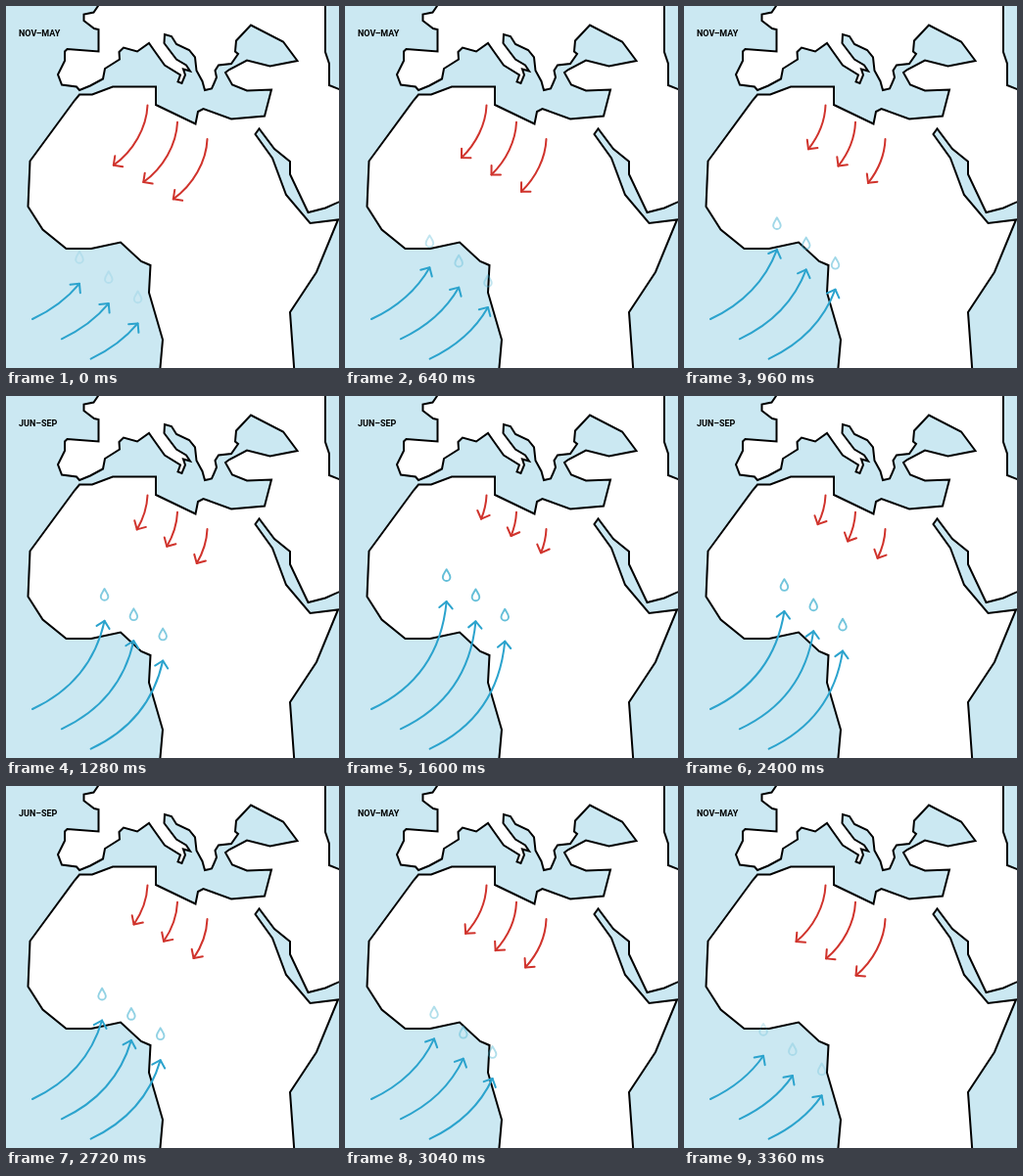
Animation of 340 by 370 pixels, one loop 3520 ms. Source, as an HTML page:

```html
<!DOCTYPE html>
<html lang="en">
<head>
<meta charset="utf-8">
<title>Seasonal winds</title>
<style>
html, body { margin: 0; width: 100%; height: 100%; overflow: hidden; background: #cbe8f2; }
svg { display: block; width: 340px; height: 370px; fill: none; stroke-width: 2; stroke-linecap: round; stroke-linejoin: round; }
text { font: bold 9px Roboto, sans-serif; fill: #000; }
</style>
</head>
<body>
<svg viewBox="0 0 340 370">
  <defs>
    <path id="head" d="M-6.7-6.7L0 0L-6.7 6.7"/>
    <g id="wet" stroke="#2ba3cd">
      <path id="wetLine" d="M27 320C65.500 302 105 266 104.500 190"/>
      <use id="wetHead" href="#head"/>
      <path id="drop" stroke="#43b1d0" stroke-width="1.9" d="M0-5.9C1.300-3.200 3.800-.5 3.800 2.100A3.800 3.800 0 0 1-3.800 2.100C-3.800-.5-1.300-3.200 0-5.900Z"/>
    </g>
    <g id="dry" stroke="#d0332c">
      <path id="dryLine" d="M144.500 101.500C143.500 126 128 152 104.800 166"/>
      <use id="dryHead" href="#head"/>
    </g>
  </defs>

  <path fill="#fff" stroke="#000" stroke-linejoin="miter" d="M157 375L160 341 146 293 147.500 265 138 261 117 241.500 87 248H61.500L37.500 228.500 22.500 205 24.500 158.500 70 96.500 75 90.500H88L109 82.500H153V101L193.500 120.500 196 108 201.500 105 230 115.500 264 112.500 271 85.500 246 86.500 231 80.500 224 68 228 65 246 55.500 269.500 61.500 297.500 56 283 36.500 250 19.500 235 35.500 234 46.500 237 49 230 59 217 60.500 213.500 66 215 73 212 80 210 84.500 203 86 200.500 77 194.500 66 193 52.500 187 45 174 39 169 31 162 29 161.500 38 174 54.500 184 60.500 188 66.500 181 64.500 183 70.500 179.500 79 175.500 77.500 178 70.500 162 60.500 152 46.500 146 38 134 46.500 120 42.500 115.500 47 116 54.500 101 64 99 74.500 86 81.500 75 86 72 82.500 57 80.500 53 70 60 56 60 46.500 62.500 44 94.500 46.500V24L90 23 79.500 15V8.500L89.500 6.500 94 0V-5H326V47L330 59V81L345 87V198L326 206.500 308.500 211 290 172V159L274 146 258.500 125.500 254.500 131 272 155.500 286 193 310.500 222 339 218.500 317 272 290 313 294.500 375Z"/>

  <use href="#dry"/>
  <use href="#dry" x="30.5" y="17.3"/>
  <use href="#dry" x="61" y="34.6"/>
  <use href="#wet"/>
  <use href="#wet" x="29.8" y="20.3"/>
  <use href="#wet" x="59.6" y="40.6"/>
  <text id="season" x="13" y="31">NOV–MAY</text>
</svg>
<script>
const LOOP = 3520, STEP = 160, HALF = LOOP / 2;
const $ = id => document.getElementById(id);

// Shows the given share of a wind line and returns its tip.
function grow(name, share) {
  const line = $(name + 'Line');
  const length = line.getTotalLength() * share;
  const tip = line.getPointAtLength(length);
  const back = line.getPointAtLength(length - 2);
  const angle = Math.atan2(tip.y - back.y, tip.x - back.x) * 180 / Math.PI;
  line.setAttribute('stroke-dasharray', `${length} 999`);
  $(name + 'Head').setAttribute('transform', `translate(${tip.x} ${tip.y}) rotate(${angle})`);
  return tip;
}

function draw(now) {
  const time = Math.floor(now % LOOP / STEP) * STEP;
  // Summer strength: 0 at 160 ms, 1 half a loop later.
  const summer = 1 - Math.abs((time - STEP + LOOP) % LOOP - HALF) / HALF;
  grow('dry', 1 - .835 * summer);
  const tip = grow('wet', .314 + .686 * summer);
  $('drop').setAttribute('transform', `translate(${tip.x} ${tip.y - 27})`);
  $('drop').setAttribute('opacity', .08 + .92 * summer);
  $('season').textContent = summer > .5 ? 'JUN–SEP' : 'NOV–MAY';
}

const start = performance.now();
function tick() {
  draw(performance.now() - start);
  requestAnimationFrame(tick);
}
tick();
</script>
</body>
</html>
```
